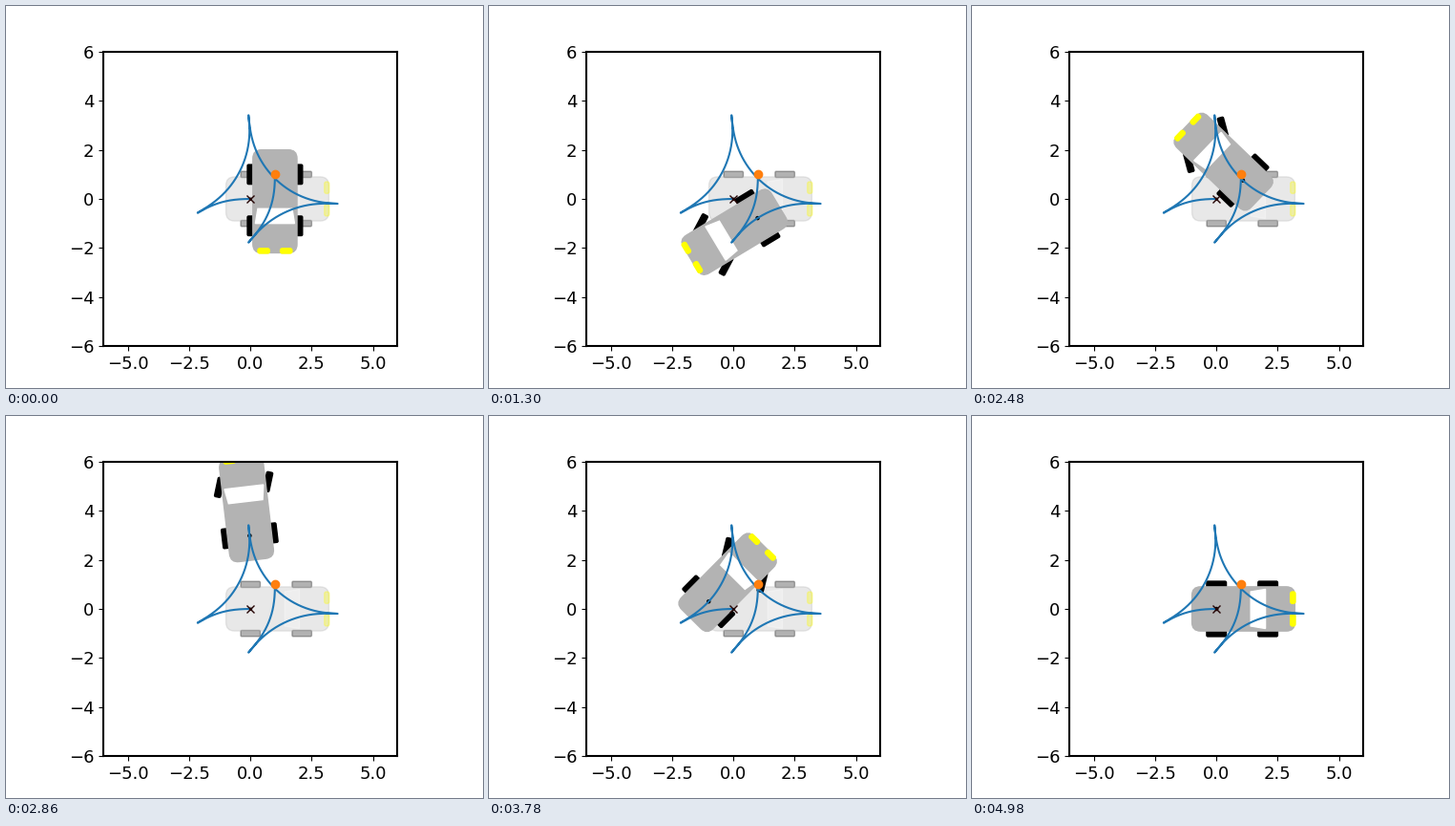
Write a matplotlib script that moves like this. It is 500 px wide and 400 px high and loops after 5000 ms.

```python
import numpy as np
import matplotlib.pyplot as plt
from matplotlib.animation import FuncAnimation
from matplotlib.patches import Circle, FancyBboxPatch, Polygon
from matplotlib.transforms import Affine2D

FRAMES, SUB = 250, 10          # SUB = integration steps per frame
WHEELBASE = 2.1
MAX_STEER, RAMP = np.radians(31), 17

# Poses where the car starts, changes gear and stops.
TIMES = [0, 43.5, 94.7, 154.7, 210.7, 249]
POINTS = [1 + 1j, -0.08 - 1.78j, 3.56 - 0.195j, -0.08 + 3.417j, -2.16 - 0.57j, 0]
HEADINGS = np.radians([-90, -130.5, -183.5, -265.7, -331, -360])
# The wheels swing through straight just before each gear change.
STRAIGHT = np.array([0] + [t - 1.5 for t in TIMES[1:-1]] + [TIMES[-1]])


def steering(t):
    k = np.clip(np.searchsorted(STRAIGHT, t, side="right") - 1, 0, 4)
    gap = np.minimum(t - STRAIGHT[k], STRAIGHT[k + 1] - t)
    return np.where(k % 2, 1, -1) * MAX_STEER * np.clip(gap / RAMP, 0, 1)


def cumulate(y):
    return np.concatenate([[0], np.cumsum((y[1:] + y[:-1]) / 2)])


def drive():
    """Position and heading, accelerating then braking on every leg."""
    pos, head = [], []
    for i in range(len(TIMES) - 1):
        t0, t1 = TIMES[i:i + 2]
        t = np.linspace(t0, t1, round((t1 - t0) * SUB) + 1)
        speed = np.minimum(t - t0, t1 - t) * (-1) ** i
        turn = cumulate(speed * np.tan(steering(t)))
        theta = HEADINGS[i] + (HEADINGS[i + 1] - HEADINGS[i]) * turn / turn[-1]
        move = cumulate(speed * np.exp(1j * theta))
        leg = POINTS[i] + move * (POINTS[i + 1] - POINTS[i]) / move[-1]
        first = 1 if i else 0
        pos.append(leg[first:])
        head.append(theta[first:])
    return np.concatenate(pos), np.concatenate(head)


class Car:
    def __init__(self, ax, alpha=None):
        self.ax, self.alpha = ax, alpha
        self.frame = Affine2D()
        self.hubs = {side: Affine2D() for side in (1, -1)}
        for side in (1, -1):
            self.box(-0.4, side - 0.125, 0.8, 0.25, 0.05, "black")
            self.box(-0.4, -0.125, 0.8, 0.25, 0.05, "black", self.hubs[side])
        self.box(-1, -0.9, 4.2, 1.8, 0.35, "0.7")
        self.add(Polygon([(1.4, -0.7), (2, -0.8), (2, 0.8), (1.4, 0.7)]), "white")
        for y in (-0.7, 0.22):
            self.box(3.02, y, 0.2, 0.48, 0.08, "yellow")
        self.add(Circle((0, 0), 0.06), "black")

    def add(self, patch, color, hub=None):
        patch.set(color=color, alpha=self.alpha, linewidth=1)
        local = self.frame if hub is None else hub + self.frame
        patch.set_transform(local + self.ax.transData)
        self.ax.add_patch(patch)

    def box(self, x, y, w, h, r, color, hub=None):
        style = f"round,pad=0,rounding_size={r}"
        self.add(FancyBboxPatch((x, y), w, h, boxstyle=style), color, hub)

    def place(self, p, theta, steer):
        self.frame.clear().rotate(theta).translate(p.real, p.imag)
        for side, hub in self.hubs.items():
            hub.clear().rotate(steer).translate(WHEELBASE, side)


plt.rcParams.update({"font.family": "DejaVu Sans", "font.size": 13,
                     "axes.linewidth": 1.5})
fig, ax = plt.subplots(figsize=(5, 4), dpi=100)
ax.set_aspect("equal")

path, heading = drive()
ghost = Car(ax, alpha=0.3)
ghost.place(0j, 0, 0)
car = Car(ax)

ax.plot(path.real, path.imag, color="C0", lw=1.5)
ax.plot(1, 1, "o", color="C1", ms=6)
ax.plot(0, 0, "x", color="#250505", ms=6)
ax.set(xlim=(-6, 6), ylim=(-6, 6),
       xticks=np.arange(-5, 5.1, 2.5), yticks=range(-6, 7, 2))


def update(i):
    k = i * SUB
    car.place(path[k], heading[k], float(steering(i)))
    return []


anim = FuncAnimation(fig, update, frames=FRAMES, interval=20,
                     repeat=True, repeat_delay=0)
plt.show()
```
